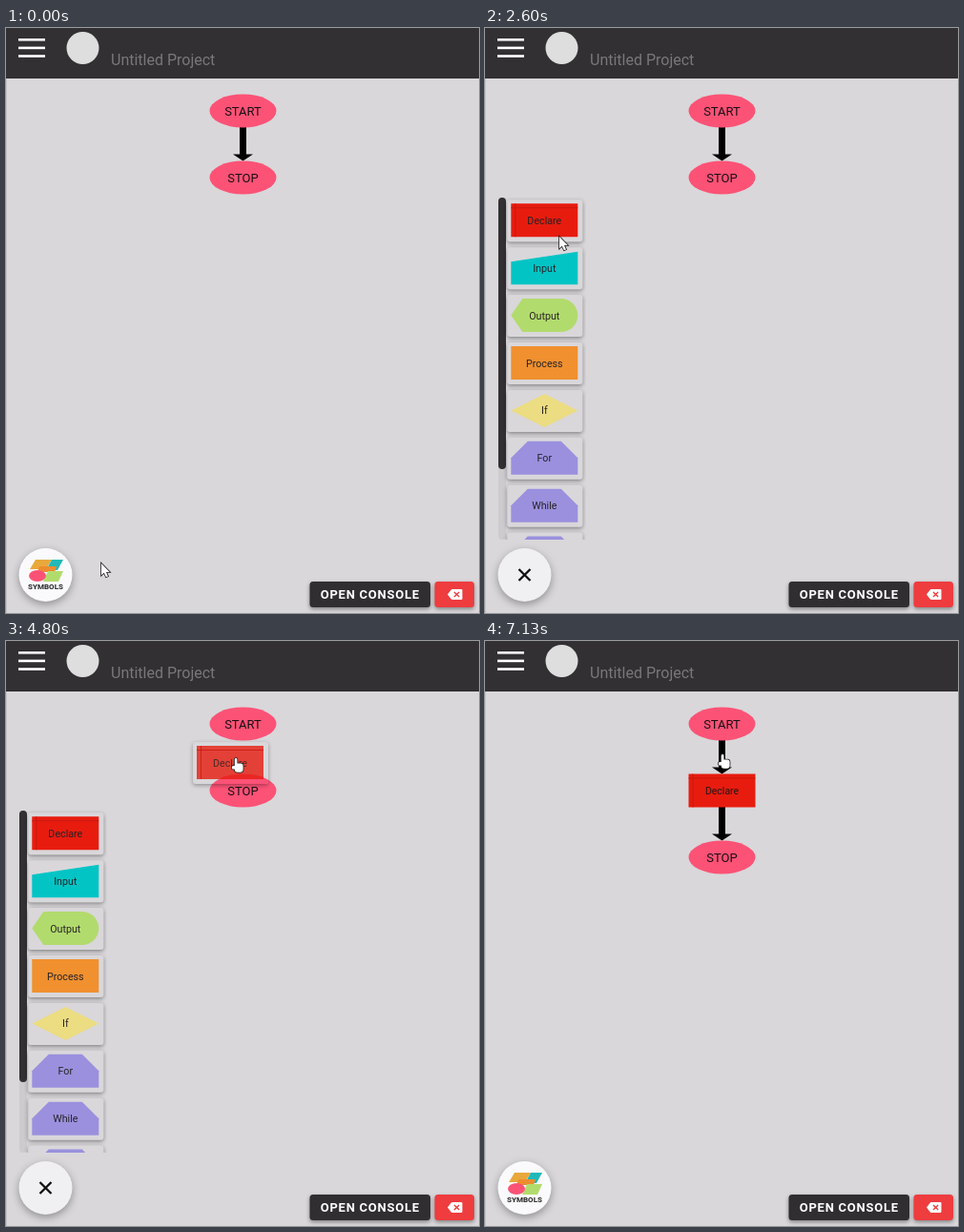
An HTML page with a canvas for the animation above (7.19 s loop, 496 by 614 pixels).

```html
<!DOCTYPE html>
<html lang="en">
<head>
<meta charset="utf-8">
<title>Flowchart editor</title>
<style>
html, body { margin: 0; width: 100%; height: 100%; overflow: hidden; background: #d9d7da; }
canvas { display: block; }
</style>
</head>
<body>
<canvas id="stage" width="496" height="614"></canvas>
<script>
const ctx = document.getElementById('stage').getContext('2d');
const LOOP = 7190, STEP = 200 / 3;
const OPEN = 1725, GRAB = 3430, HOVER = 4660, DROP = 5660, DRAG_LAG = 25;
const INK = '#323032', PAPER = '#d9d7da', PINK = '#fc5276', RED = '#e71c0f', ALERT = '#ee3c3f';
const W = 70, H = 35, MID = 248.5, PITCH = 49.9;
const FAB = { x: 41.5, y: 574, r: 28 };

// Pointer moves: each slows down by `power`; `bend` curves the path
const HOME = { x: 100, y: 562 };
const MOVES = [
  { from: 935, to: 1470, x: 42, y: 568, power: 2, bend: 1 },
  { from: 1765, to: 2465, x: 78, y: 219, power: 2, bend: 2 },
  { from: 2600, to: 3130, x: 67, y: 198, power: 2, bend: 1 },
  { from: 3498, to: 5508, x: 249, y: 119, power: 3, bend: 1.3 }
];

const clamp = v => Math.max(0, Math.min(1, v));
const ramp = (t, a, b) => clamp((t - a) / (b - a));

function pointer(t) {
  let { x, y } = HOME;
  for (const m of MOVES) {
    const k = 1 - (1 - ramp(t, m.from, m.to)) ** m.power;
    x += (m.x - x) * k;
    y += (m.y - y) * k ** m.bend;
  }
  return { x, y };
}

function poly(color, ...pts) {
  ctx.fillStyle = color;
  ctx.beginPath();
  for (let i = 0; i < pts.length; i += 2) ctx.lineTo(pts[i], pts[i + 1]);
  ctx.fill();
}

function rect(color, x, y, w, h, r = 0) {
  ctx.fillStyle = color;
  ctx.beginPath();
  ctx.roundRect(x, y, w, h, r);
  ctx.fill();
}

function oval(color, x, y, rx, ry = rx) {
  ctx.fillStyle = color;
  ctx.beginPath();
  ctx.ellipse(x, y, rx, ry, 0, 0, Math.PI * 2);
  ctx.fill();
}

function shadowed(blur, dy, alpha, draw) {
  ctx.save();
  ctx.shadowColor = `rgba(0,0,0,${alpha})`;
  ctx.shadowBlur = blur;
  ctx.shadowOffsetY = dy;
  draw();
  ctx.restore();
}

function text(str, x, y, size, color, { align = 'center', weight = 400, gap = 0 } = {}) {
  ctx.font = `${weight} ${size}px Roboto, sans-serif`;
  ctx.letterSpacing = gap + 'px';
  ctx.textAlign = align;
  ctx.fillStyle = color;
  ctx.fillText(str, x, y);
}

function cross(x, y, r, width, color) {
  ctx.strokeStyle = color;
  ctx.lineWidth = width;
  ctx.beginPath();
  for (const s of [-1, 1]) {
    ctx.moveTo(x - r, y - r * s);
    ctx.lineTo(x + r, y + r * s);
  }
  ctx.stroke();
}

// Each symbol fills a W by H box at x, y
function declare(x, y) {
  rect(RED, x, y, W, H);
  rect('#c9180f', x + 4, y, 1, H);
  rect('#c9180f', x, y + 4, W, 1);
}

function input(x, y) {
  poly('#02c4c5', x, y + 11, x + W, y + .5, x + W, y + H, x, y + H);
}

function output(x, y) {
  const r = H / 2;
  ctx.fillStyle = '#b2db6d';
  ctx.beginPath();
  ctx.moveTo(x + 12, y + H);
  ctx.lineTo(x, y + r);
  ctx.lineTo(x + 12, y);
  ctx.arc(x + W - r, y + r, r, -Math.PI / 2, Math.PI / 2);
  ctx.fill();
}

function decision(x, y) {
  poly('#ecdc82', x, y + H / 2, x + W / 2, y, x + W, y + H / 2, x + W / 2, y + H);
}

function loopShape(x, y) {
  const c = H / 2;
  poly('#9a90de', x, y + c, x + c, y, x + W - c, y, x + W, y + c, x + W, y + H, x, y + H);
}

const SYMBOLS = {
  Declare: declare,
  Input: input,
  Output: output,
  Process: (x, y) => rect('#f0902f', x, y, W, H),
  If: decision,
  For: loopShape,
  While: loopShape,
  'Do While': loopShape
};

// The card face is see-through: only its outer shadow is drawn
function card(label, x, y) {
  ctx.save();
  ctx.beginPath();
  ctx.rect(x - 20, y - 20, W + 40, H + 40);
  ctx.roundRect(x - 4, y - 4, W + 9, H + 9, 3);
  ctx.clip('evenodd');
  shadowed(4, 1.5, .42, () => rect(PAPER, x - 4, y - 4, W + 9, H + 9, 3));
  ctx.restore();
  SYMBOLS[label](x, y);
  text(label, x + W / 2, y + 21.5, 10.7, '#272326');
}

function panel(alpha) {
  ctx.save();
  ctx.globalAlpha = alpha;
  rect('#cdcbce', 14, 178, 8, 359, 4);
  rect(INK, 14, 178, 8, 285, 4);
  ctx.beginPath();
  ctx.rect(14, 176, 92, 361);
  ctx.clip();
  Object.keys(SYMBOLS).forEach((label, i) => card(label, 27.3, 184.3 + i * PITCH));
  ctx.restore();
}

function ghost(t) {
  const { x, y } = pointer(t - DRAG_LAG);
  ctx.globalAlpha = .8;
  card('Declare', Math.round(x) - 40, Math.round(y) - 14);
  ctx.globalAlpha = 1;
}

function terminal(label, y) {
  oval(PINK, MID, y, W / 2, H / 2);
  text(label, MID, y + 4.5, 13, '#1a1014');
}

function flowArrow(y) {
  rect('#000', MID - 3.5, y, 7, 29);
  poly('#000', MID - 10.5, y + 28.5, MID + 10.5, y + 28.5, MID, y + 35.5);
}

function chart(t) {
  const dropped = t >= DROP;
  if (t < HOVER || dropped) flowArrow(104);
  terminal('START', 87);
  if (dropped) {
    flowArrow(174);
    declare(MID - W / 2, 139.5);
    text('Declare', MID, 161, 10.5, '#2a1514');
  }
  terminal('STOP', dropped ? 227 : 157);
}

function header() {
  rect(INK, 0, 0, 496, 53);
  for (let i = 0; i < 3; i++) rect('#fff', 13, 11 + i * 8.6, 28, 2.6);
  oval('#dedede', 80.5, 21, 17);
  text('Untitled Project', 110, 39, 16, '#79777a', { align: 'left' });
}

// Parallelogram leaning by `lean`
function slant(color, x, y, w, h, lean) {
  poly(color, x + lean, y, x + w, y, x + w - lean, y + h, x, y + h);
}

function symbolIcon() {
  slant('#e9a83c', 25, 558, 23, 10, 6);
  slant('#1fb9b9', 42, 558, 18, 11, 6);
  slant('#ee8c30', 33, 565, 20, 6, 2);
  slant('#b2db6d', 39, 570, 21, 11, 5);
  oval(PINK, 33, 575, 9, 6);
  text('SYMBOLS', FAB.x, 589, 8, '#222', { weight: 700 });
}

function fab(t) {
  const open = t >= OPEN && t < DROP;
  const press = ramp(t, OPEN - 66, OPEN + 140) * (1 - ramp(t, 2070, 2400));
  const level = open ? Math.round(240 - 44 * press) : 250;
  shadowed(9, 3, .34, () => oval(`rgb(${level},${level},${level + 2})`, FAB.x, FAB.y, FAB.r));
  if (open) cross(FAB.x, FAB.y, 6, 2.3, '#111');
  else symbolIcon();
}

function toolbar() {
  shadowed(4, 2, .4, () => {
    rect('#302e31', 318.5, 581, 126.5, 27, 3.5);
    rect(ALERT, 449.5, 581, 41.5, 27, 3.5);
  });
  text('OPEN CONSOLE', 329.7, 599, 13, '#fff', { align: 'left', weight: 700, gap: .75 });
  rect('#fff', 467, 589, 11.5, 11, 1);
  poly('#fff', 463, 594.5, 467.3, 589, 467.3, 600);
  cross(472.6, 594.5, 2.6, 1.4, ALERT);
}

const ARROW = new Path2D('M0 0V12.3L2.8 9.7 4.9 14.3 7 13.4 5 8.9H8.7Z');
const HAND = new Path2D();
HAND.roundRect(-1.2, 0, 2.6, 10, 1.3);
HAND.roundRect(-4.2, 8, 5, 3.5, 1.5);
HAND.roundRect(-1.2, 5.5, 8.8, 9.2, [1, 2.5, 3, 3]);

function cursor(t) {
  const { x, y } = pointer(t);
  const onFab = t < OPEN && Math.hypot(x - FAB.x, y - FAB.y) < FAB.r;
  const shape = t >= GRAB || onFab ? HAND : ARROW;
  ctx.save();
  ctx.translate(Math.round(x), Math.round(y));
  ctx.lineWidth = 1.6;
  ctx.strokeStyle = '#222';
  ctx.fillStyle = '#fff';
  ctx.stroke(shape);
  ctx.fill(shape);
  ctx.restore();
}

function draw(t) {
  rect(PAPER, 0, 0, 496, 614);
  rect('#c6c4c7', 0, 53, 1, 561);
  header();
  chart(t);
  if (t >= OPEN) panel(ramp(t, OPEN - 66, OPEN + 140) * (1 - ramp(t, DROP - 66, DROP + 200) * (t >= DROP)));
  fab(t);
  toolbar();
  if (t > GRAB && t < DROP) ghost(t);
  cursor(t);
}

function tick() {
  const t = performance.now() % LOOP;
  draw(Math.floor((t + 5) / STEP) * STEP);
  requestAnimationFrame(tick);
}
tick();
</script>
</body>
</html>
```
